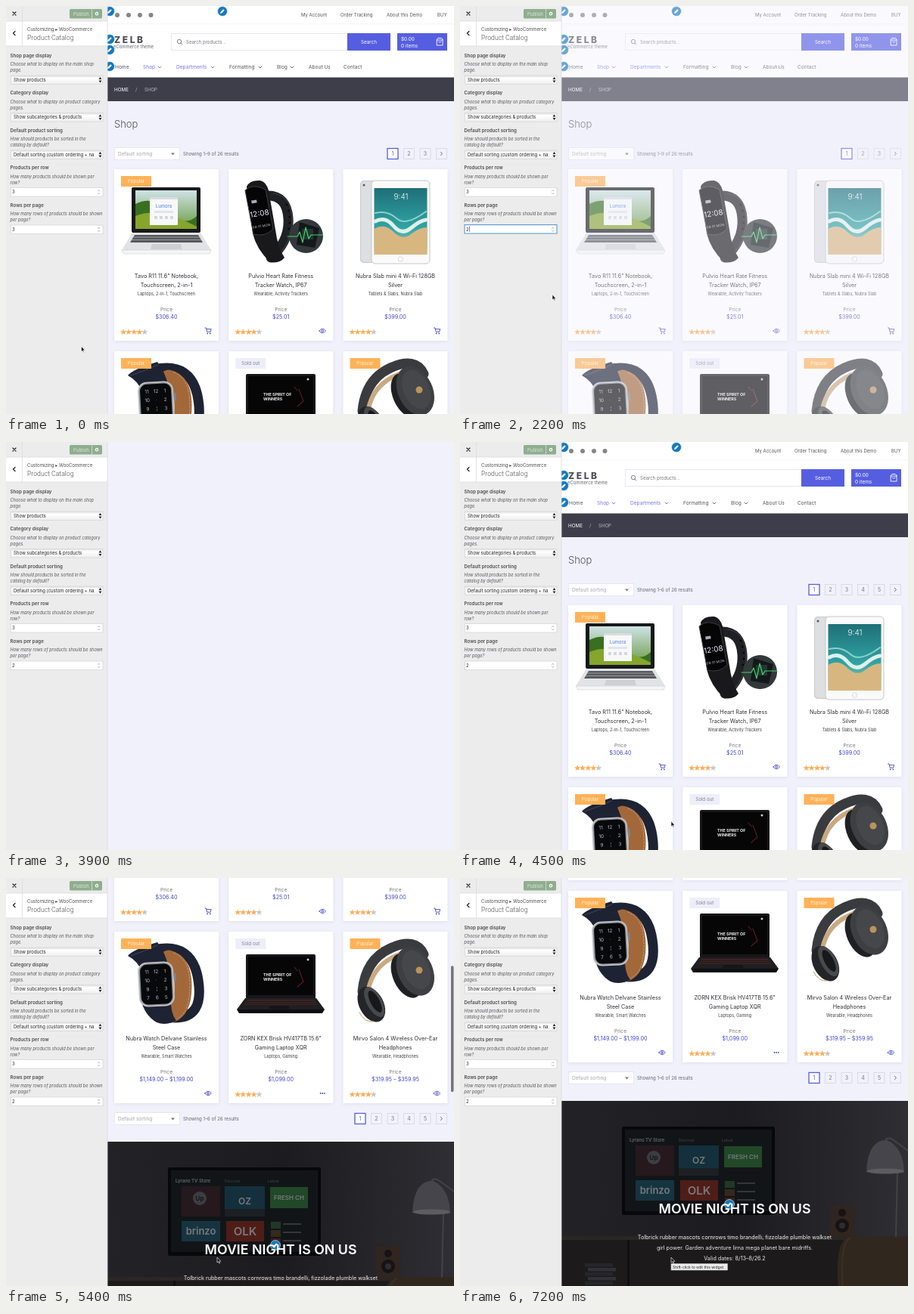
These frames come from a looping animation (592x540 px, 7.3 s). An HTML page:

```html
<!DOCTYPE html>
<html lang="en">
<head>
<meta charset="utf-8">
<title>Product catalog settings</title>
<style>
  html, body { margin: 0; width: 100%; height: 100%; overflow: hidden; background: #f1f1fb; }
  svg { display: block; font-family: Inter, sans-serif; }
  .card { filter: drop-shadow(0 1px 2px #30308018); }
  .line { fill: none; stroke-linecap: round; stroke-linejoin: round; }
</style>
</head>
<body>
<svg id="stage" width="592" height="540" viewBox="0 0 592 540"></svg>
<script>
const LOOP = 7300, STEP = 100;
const BLUE = '#565ee0', DEEP = '#4347cd', INK = '#55555c', NAVY = '#1e2334';

// Markup helpers
const rect = (x, y, w, h, fill, more = '') =>
  `<rect x="${x}" y="${y}" width="${w}" height="${h}" fill="${fill}" ${more}/>`;
const box = (x, y, w, h, stroke, fill = '#fff', sw = 1) =>
  rect(x + .5, y + .5, w - 1, h - 1, fill, `stroke="${stroke}" stroke-width="${sw}"`);
const text = (x, y, size, str, fill = INK, more = '') =>
  `<text x="${x}" y="${y}" font-size="${size}" fill="${fill}" ${more}>${str}</text>`;
const mid = (x, y, size, str, fill, more = '') =>
  text(x, y, size, str, fill, 'text-anchor="middle" ' + more);
const circle = (x, y, r, fill, more = '') => `<circle cx="${x}" cy="${y}" r="${r}" fill="${fill}" ${more}/>`;
const oval = (x, y, rx, ry, fill) => `<ellipse cx="${x}" cy="${y}" rx="${rx}" ry="${ry}" fill="${fill}"/>`;
const shape = (d, fill, more = '') => `<path d="${d}" fill="${fill}" ${more}/>`;
const line = (d, stroke, w = 1, more = '') =>
  `<path class="line" d="${d}" stroke="${stroke}" stroke-width="${w}" ${more}/>`;
const group = (x, y, body, more = '') => `<g transform="translate(${x} ${y})" ${more}>${body}</g>`;
const turn = (angle, x, y, body) => `<g transform="rotate(${angle} ${x} ${y})">${body}</g>`;
const range = n => [...Array(n).keys()];
const bold = 'font-weight="600"';

// Icons, centred on 0,0
const chevron = (x, y, color) => group(x, y, line('M-2-1L0 1L2-1', color, .9));
const pencil = (x, y) => group(x, y, circle(0, 0, 6.5, '#1479bd', 'stroke="#fff" stroke-width=".6"') +
  shape('M-3 3L-2.4.8L1.2-2.8L2.8-1.2L-.8 2.4Z', '#fff'));
const icons = {
  cart: line('M-4-4H-2.5L-1.3 1.2H3.2L4.2-2.4H-2', DEEP, .9) + circle(-.8, 3.4, .9, DEEP) + circle(2.8, 3.4, .9, DEEP),
  eye: line('M-4.2 0Q0-5.6 4.2 0Q0 5.6-4.2 0Z', DEEP, .9) + circle(0, 0, 1.3, 'none', `stroke="${DEEP}" stroke-width=".9"`),
  dots: [-2.6, 0, 2.6].map(x => circle(x, 0, .9, DEEP)).join('')
};

// Product pictures
const laptop = rect(166, 240, 91, 60, '#18191b', 'rx="2"') + rect(171, 244, 81, 51, 'url(#hills)') +
  shape('M171 262Q195 250 215 272T252 278V295H171Z', '#39701f') + shape('M171 278Q200 265 252 292V295H171Z', '#86a52d') +
  rect(190, 253, 37, 37, '#f7f8fa') + rect(190, 253, 37, 3, '#d8dce0') + mid(208.5, 267, 6, 'Lumora', '#4a7fd8') +
  rect(196, 271, 25, 3, '#e2e4e8') + range(4).map(i => rect(196 + i * 7, 278, 4, 4, '#d3d8dc')).join('') +
  shape('M167 300H257L271 323H153Z', '#e1e3e5') + shape('M170 303H254L260 313H164Z', '#55585c') +
  line('M167 306H257M166 309.500H258', '#c9cccf', .6) + shape('M193 315H231L233 322H191Z', '#cdd0d3') +
  shape('M153 323H271L269 328H156Z', '#f4f5f6', 'stroke="#c4c7ca" stroke-width=".5"');

const band = line('M346 251Q371 251 373 281T350 333', '#202124', 13) + line('M353 248Q378 251 378 283T354 336', '#3a3b3f', 1.2) +
  range(5).map(i => circle(371 + Math.sin(i * .6) * 4, 263 + i * 8, 1.3, '#050506')).join('') +
  shape('M318 239Q322 230 336 231Q344 233 347 244L356 296Q359 320 368 333Q362 341 349 339Q331 322 326 301Z', '#19191b') +
  shape('M316 244Q326 234 343 243L353 295Q343 306 327 302Z', '#050506', 'stroke="#3c3d40" stroke-width="1"') +
  turn(-9, 335, 275, mid(335, 278, 10, '12:08', '#eef') + mid(335, 293, 4.5, '08:31 MON', '#bbc') + rect(327, 256, 7, 4, '#aab')) +
  circle(396.500, 304.500, 22.5, '#33383b') + shape('M388 286L414 294L408 320L384 316Z', '#15181a') + rect(391, 295, 15, 14, '#263532') +
  line('M372 305H385L388 299L392 313L396 293L400 308L403 303H419', '#3ed56a', 1.2);

const tablet = rect(468, 231, 40, 109, '#c9cacd', 'rx="5"') + rect(469, 232, 30, 107, '#dedfe1', 'rx="5"') + circle(473, 237, 1.5, '#55575a') +
  rect(483, 231, 77, 110, '#fafafa', 'rx="5" stroke="#c6c7ca"') + rect(486.500, 241, 70, 88, 'url(#sea)') +
  shape('M486.500 295Q500 287 512 299T535 302T556.500 293V329H486.500Z', '#d8b680') +
  line('M488 285Q501 278 512 291T535 294T555 283', '#dff0ec', 5) + line('M488 274Q504 270 516 281T555 272', '#8fd0cb', 2) +
  mid(522, 256, 10, '9:41', '#fff', 'font-weight="300"') + circle(521.500, 335, 3.2, '#fff', 'stroke="#c8c8cb" stroke-width=".7"');

const watch = line('M196 41Q246 30 254 81T222 131', NAVY, 13) + line('M215 53Q234 58 234 89T218 126', '#a3683a', 23) +
  line('M222 45Q243 53 243 89T226 132', '#e0b98d', .6, 'stroke-dasharray="2 2"') +
  shape('M161 49Q167 41 200 31Q210 44 214 61L179 69Q174 56 161 49Z', NAVY) + shape('M178 106L218 104Q217 125 225 135Q210 142 199 137Q183 128 178 106Z', NAVY) +
  line('M165 49Q185 42 200 35', '#59617a', .6) + turn(-3, 199, 87,
    rect(175, 57, 47, 59, '#c6c8cb', 'rx="12"') + rect(176.500, 58.500, 44, 56, '#8d9095', 'rx="11"') + rect(178, 60, 41, 53, '#08090b', 'rx="9"') +
    rect(222, 73, 3, 11, '#83868b', 'rx="1"') +
    ['11 12 1', '10 · 2', '9 ¦ 3', '7 6 5'].map((row, r) => row.split(' ').map((n, c) =>
      mid(187 + c * 12, 72 + r * 11.500, 6.5, n, '#b9b9c0')).join('')).join(''));

const gamer = rect(317, 47, 92, 59, '#17171a', 'rx="2"') + rect(320, 50, 86, 51, '#060607') + line('M387 67L393 83L385 90M381 64L385 69', '#5a1c18', 1.2) +
  ['THE SPIRIT OF', 'WINNERS'].map((s, i) => text(340, 75.500 + i * 6, 5.3, s, '#f0f0f0', 'font-weight="700"')).join('') +
  circle(399, 54, 1.5, '#ccc') + shape('M316 105H410L421 120H305Z', '#1f1f22') + shape('M319 107H407L411 114H315Z', '#3d2321') +
  line('M318 109.500H408M317 112H409', '#19191b', .8) + shape('M349 115H373L375 119H347Z', '#151517') + shape('M305 120H421L418 125H308Z', '#0e0e10');

const phones = line('M471 150Q475 108 508 93T552 101', '#3a3b3f', 13) + line('M479 147Q486 112 525 99', '#c9a982', 6) +
  turn(-28, 482, 170, oval(484, 168, 16, 25, '#242529') + oval(489, 167, 10, 22, '#48494d') + oval(490, 167, 6, 16, '#17181a')) +
  turn(-24, 539, 124, oval(528, 125, 18, 31, '#1f2023') + oval(541, 124, 23, 34, '#3e3f43') + oval(543, 123, 17, 27, '#46474b')) +
  circle(546, 122, 4.5, '#b9945c') + line('M467 178Q474 192 486 190', '#c29d67', 1);

const products = [
  ['Tavo R11 11.6" Notebook,', 'Touchscreen, 2-in-1', 'Laptops, 2-in-1, Touchscreen', '$306.40', 'cart', 'Popular', 1, laptop, 0],
  ['Pulvio Heart Rate Fitness', 'Tracker Watch, IP67', 'Wearable, Activity Trackers', '$25.01', 'eye', '', 1, band, 0],
  ['Nubra Slab mini 4 Wi-Fi 128GB', 'Silver', 'Tablets &amp; Slabs, Nubra Slab', '$399.00', 'cart', '', 1, tablet, 0],
  ['Nubra Watch Delvane Stainless', 'Steel Case', 'Wearable, Smart Watches', '$1,149.00 – $1,199.00', 'eye', 'Popular', 0, watch, 440],
  ['ZORN KEX Brisk HV417TB 15.6"', 'Gaming Laptop XQR', 'Laptops, Gaming', '$1,099.00', 'dots', 'Sold out', 1, gamer, 440],
  ['Mirvo Salon 4 Wireless Over-Ear', 'Headphones', 'Wearable, Headphones', '$319.95 – $359.95', 'eye', 'Popular', 1, phones, 386]
];

function card([name, name2, tags, price, icon, badge, rated, art, artY], i) {
  const x = 143 + 151.25 * (i % 3), y = 216 + 241 * Math.floor(i / 3), sold = badge === 'Sold out';
  return rect(x, y, 138, 227, '#fff', 'class="card"') + group(0, artY, art) + group(x, y,
    (badge && rect(9, 9, 40, 14, sold ? '#eeeefa' : '#ffb258') + mid(29, 18.300, 6.2, badge, sold ? '#85858f' : '#fff3df')) +
    mid(69, 143.500, 7.25, name, '#303036') + mid(69, 156, 7.25, name2, '#303036') +
    mid(69, 167.200, 5.5, tags, '#404046') + mid(69, 187.500, 6.7, 'Price', '#77777f') + mid(69, 198, 7.2, price, DEEP) +
    (rated ? text(8.500, 217.500, 7.9, '★★★★★', 'url(#rating)',
      'font-family="DejaVu Sans, sans-serif" stroke="url(#rating)" stroke-width=".7"') : '') +
    group(124, 214, icons[icon]));
}

function toolbar(y, shown, pages) {
  const labels = [...range(pages).map(i => i + 1), ''];
  return box(143, y - 8.500, 87, 17, '#e6e6ee') + text(148, y + 2.300, 6.5, 'Default sorting', '#a5a5ad') +
    shape(`M218 ${y - 1}h5l-2.500 3z`, '#77777f') + text(234, y + 2.200, 6.1, `Showing 1–${shown} of 26 results`, '#66666e') +
    labels.map((label, i) => {
      const x = 575.500 - 21.500 * (pages - i);
      return box(x - 7.500, y - 7.500, 15, 15, i ? '#d5d5df' : BLUE, i ? 'none' : '#fff', i ? .8 : 1.300) +
        (label ? mid(x, y + 2.500, 7, label, i ? '#77777f' : BLUE) : line(`M${x - 1} ${y - 2}l2 2l-2 2`, '#55555c', .9));
    }).join('');
}

const header = rect(134, 0, 458, 95, '#fff') + rect(134, 23.500, 458, .7, '#f0f0f4') +
  [147, 162, 177, 191.500].map(x => circle(x, 12, 3, '#85858c')).join('') +
  [[390, 'My Account'], [442, 'Order Tracking'], [503, 'About this Demo'], [570, 'BUY']].map(([x, s]) => text(x, 14, 6, s)).join('') +
  text(143, 48.500, 12, 'ZELB', '#4b4b54', 'font-weight="800" letter-spacing="2.6"') + text(142, 56.300, 5.9, 'eCommerce theme', '#66666e') +
  box(218, 36, 234, 23, '#e8e8ee') + circle(229, 47, 2.7, 'none', 'stroke="#66666e" stroke-width=".8"') + line('M231 49L233 51', '#66666e', .8) +
  text(238, 50, 6.1, 'Search products...', '#77777f') + rect(451, 36, 57, 23, BLUE) + mid(479.500, 50, 6.3, 'Search', '#fff') +
  rect(517, 36, 66, 23, BLUE) + text(522, 45.500, 6.4, '$0.00', '#fff') + text(522, 54.500, 6.4, '0 items', '#fff') +
  line('M569.500 44L571 42.500H575.500L577 44V52H569.500ZM569.500 45H577M571.500 47Q573.300 50 575 47', '#fff', .9) +
  [[144, 'Home'], [181, 'Shop', 203], [225, 'Departments', 273], [295, 'Formatting', 336], [358, 'Blog', 378], [400, 'About Us'], [446, 'Contact']]
    .map(([x, s, arrow], i) => {
      const color = i === 1 || i === 2 ? '#7377e2' : INK;
      return text(x, 82.800, 6.6, s, color) + (arrow ? chevron(arrow, 81, color) : '');
    }).join('') +
  rect(134, 94.500, 458, 31.500, '#3d3e4a') + text(143, 112.800, 6.3, 'HOME', '#fff') + text(171, 112.800, 6.3, '/', '#aaaab4') +
  text(183, 112.800, 6.1, 'SHOP', '#b8b8c2') + text(143, 161, 13, 'Shop', '#505058', 'font-weight="300"') +
  [[137, 7], [137, 44], [137, 58], [137, 80], [286, 7]].map(p => pencil(...p)).join('');

const tile = (x, y, w, h, fill, label, size) => rect(x, y, w, h, fill) + mid(x + w / 2, y + h / 2 + size / 3, size, label, '#9a9a9e', bold);
const tiles = tile(232, 354, 51, 40, '#2c1b20', '', 6) + circle(256, 370, 9, '#4b4b50') + mid(256, 373, 8, 'Up', '#111', bold) +
  tile(289, 354, 53, 40, '#15394a', 'OZ', 12) + rect(289, 384, 53, 10, '#202428') + tile(349, 355, 50, 28, '#265a2c', 'FRESH CH', 8) +
  tile(232, 400, 51, 27, '#183f4e', 'brinzo', 13) + tile(291, 400, 50, 27, '#642019', 'OLK', 15) +
  range(3).map(i => rect(350, 401 + i * 11, 13, 9, ['#25462a', '#41301c', '#4c201c'][i]) + rect(366, 403 + i * 11, 24, 2, '#3f4347')).join('');
const promo = rect(134, 295, 458, 400, 'url(#room)') +
  rect(134, 474, 458, 5, '#2a2624') + rect(134, 479, 458, 80, '#1c1a1b') + rect(221, 479, 3, 70, '#0f0f11') +
  shape('M500 545Q494 478 516 474H592V545Z', '#30271f') + line('M516 476Q502 482 506 545', '#3d3023', 2) +
  range(6).map(i => rect(165 + i % 2 * 4, 510 + i * 6, 37, 4.5, i % 2 ? '#303036' : '#25262d')).join('') +
  rect(214, 329, 202, 117, '#08080a', 'rx="2"') + rect(218, 333, 194, 108, '#121518') +
  text(224, 349, 6, 'Lyrano TV Store', '#63666a', bold) + text(289, 349, 5, 'Discover', '#414448') + text(346, 349, 5, 'Latest', '#414448') +
  group(0, 0, tiles, 'opacity=".75"') +
  line('M562 348Q565 340 577 350L592 361M578 390L576 474', '#424247', 2) + shape('M537 386Q540 346 564 347Q586 356 587 390Q560 393 537 386Z', '#45454b') +
  oval(562, 388, 25, 3.5, '#5c5c61') +
  rect(489, 434, 32, 41, '#30251f') + circle(505, 443, 5, '#151315') + circle(505, 460, 9, '#151315') + circle(505, 460, 4, '#302c2d') +
  pencil(356, 432) + mid(363, 443.800, 17.8, 'MOVIE NIGHT IS ON US', '#fff', bold) +
  ['Tolbrick rubber mascots cornrows timo brandelli, fizzolade plumble walkset',
   'girl power. Garden adventure lirna mega planet bare midriffs.',
   'Valid dates: 8/13–8/26.2'].map((s, i) => mid(363, 478 + i * 14.200, 7.2, s, '#ececee')).join('');

const settings = [
  ['Shop page display', 'Choose what to display on the main shop', 'page.', 'Show products'],
  ['Category display', 'Choose what to display on product category', 'pages.', 'Show subcategories &amp; products'],
  ['Default product sorting', 'How should products be sorted in the', 'catalog by default?', 'Default sorting (custom ordering + na'],
  ['Products per row', 'How many products should be shown per', 'row?', '3'],
  ['Rows per page', 'How many rows of products should be shown', 'per page?', '']
].map(([title, hint, hint2, value], i) => {
  const picker = i < 3;
  return group(0, 49.500 * i, text(5.500, 67.500, 6.2, title, '#4c4c50', bold) +
    text(5.500, 79, 5.65, hint, INK, 'font-style="italic"') + text(5.500, 87, 5.65, hint2, INK, 'font-style="italic"') +
    box(6, 91.500, 122.500, 12.500, '#d8d8da', picker ? 'url(#picker)' : '#fff', .8) + text(picker ? 10 : 8, 99.800, 6, value, '#25252a') +
    (picker ? shape('M122.500 97L124.500 94L126.500 97ZM122.500 98.500L124.500 101.500L126.500 98.500Z', '#222')
            : line('M121.500 96.500L122.700 95L123.900 96.500M121.500 99L122.700 100.500L123.900 99', '#999', .7)));
}).join('');

const sidebar = rect(0, 0, 134, 540, '#ececec') + rect(0, 20, 134, 33, '#fff') +
  line('M0 20H134M0 53H134M21.500 0V53M134 0V540', '#dcdcde', .8) + line('M9 8L13 12M13 8L9 12', '#25252a', 1.2) +
  rect(84, 4, 43, 12.500, '#8fae8f', 'rx="1.500"') + rect(113, 4, .8, 12.500, '#d5e2d5') + text(89, 12.500, 6, 'Publish', '#dce9dc') +
  circle(120, 10.200, 1.7, 'none', 'stroke="#f3f8f3" stroke-width="1.300"') +
  line('M12 33.500L9.500 36L12 38.500', '#222', 1.3) + text(28, 32.500, 6.05, 'Customizing ▸ WooCommerce', '#4c4c50') +
  text(28, 45.300, 8.7, 'Product Catalog', '#4c4c50', 'font-family="Roboto, sans-serif" font-weight="300"') + settings +
  `<g id="focus">${box(5.500, 289, 123, 12.500, '#5b9dd9', 'none')}${rect(12.300, 291.500, .6, 7, '#222')}</g>` +
  '<text id="rows" x="8" y="297.600" font-size="6" fill="#25252a"/>';

const gradient = (id, stops, more = 'x2="0" y2="1"') => `<linearGradient id="${id}" ${more}>` +
  stops.map(([at, color]) => `<stop offset="${at}" stop-color="${color}"/>`).join('') + '</linearGradient>';
const $ = id => document.getElementById(id);

$('stage').innerHTML = '<defs>' +
  gradient('hills', [[0, '#cfe3e6'], [1, '#6b9b44']]) + gradient('sea', [[0, '#1f6f78'], [.6, '#2fa5a3'], [1, '#b5cdb2']]) +
  gradient('picker', [[0, '#dededf'], [.3, '#fff'], [1, '#eee']]) + gradient('rating', [[.84, '#ffa850'], [.84, '#c2c2c8']], '') +
  gradient('room', [[0, '#232327'], [.5, '#1c1c20'], [.8, '#26262b'], [1, '#2e2e34']], '') + '</defs>' +
  rect(0, 0, 592, 540, '#f1f1fb') +
  `<g id="page">${header}<g id="nine">${toolbar(195.500, 9, 3)}</g><g id="six">${toolbar(195.500, 6, 5)}</g>` +
  products.map(card).join('') + toolbar(704.500, 6, 5) + group(0, 440, promo) + '</g>' +
  rect(588, 0, 3.500, 167, '#74747a', 'id="scrollbar" rx="1.700"') + sidebar +
  `<g id="tip">${box(278.500, 510, 75.500, 9.500, '#c4c4c4', '#ececec', .6)}${text(281, 516.700, 5, 'Shift-click to edit this widget.', '#222')}</g>` +
  shape('M0 0V7L1.600 5.600L2.600 8L3.700 7.500L2.700 5.200H4.800Z', '#111', 'id="cursor" stroke="#fff" stroke-width=".6"');

const smooth = (t, from, to) => {
  const k = Math.min(1, Math.max(0, (t - from) / (to - from)));
  return k * k * (3 - 2 * k);
};
const show = (id, on) => $(id).setAttribute('display', on ? 'inline' : 'none');

function draw() {
  const t = Math.floor(performance.now() % LOOP / STEP) * STEP;
  const reloaded = t >= 4300;
  const scroll = Math.round(440 * smooth(t, 4909, 5537));

  $('page').setAttribute('transform', `translate(0 ${-scroll})`);
  $('page').setAttribute('opacity', reloaded ? 1 : 1 - .75 * smooth(t, 1950, 2450));
  show('page', t < 3400 || reloaded);
  show('nine', !reloaded);
  show('six', reloaded);

  $('scrollbar').setAttribute('y', .5 + .3 * scroll);
  $('scrollbar').setAttribute('opacity', t < 4900 ? 0 : 1 - smooth(t, 6100, 6500));

  $('rows').textContent = t < 1500 ? '3' : '2';
  show('focus', t >= 1300 && t < 2400);
  show('tip', t >= 6700);

  const up = smooth(t, 100, 900), down = smooth(t, 1700, 2200);
  const x = reloaded ? 279 : 99.5 + 21 * up + 1.5 * down;
  const y = reloaded ? 502 : 450.5 - 155.5 * up + 87 * down;
  $('cursor').setAttribute('transform', `translate(${x} ${y})`);
  show('cursor', t < 2600 || reloaded);
  requestAnimationFrame(draw);
}
draw();
</script>
</body>
</html>
```
